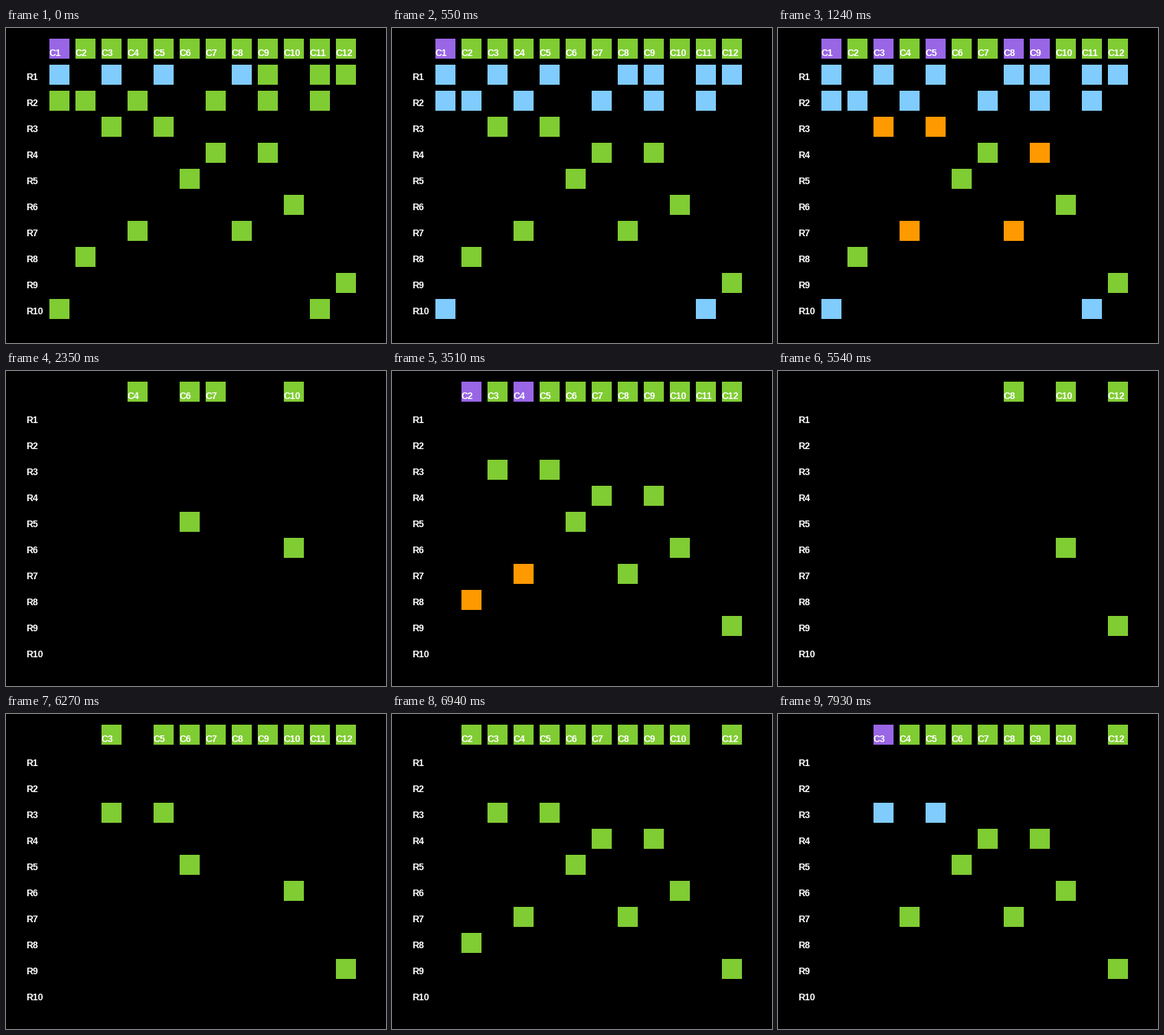
Write a matplotlib script that moves like this. It is 569 by 472 pixels and loops after 8000 ms.

```python
import numpy as np
import matplotlib.pyplot as plt
from matplotlib.animation import FuncAnimation
from matplotlib.collections import PolyCollection

W, H, DPI = 569, 472, 64
LOOP, TICK = 8000, 20
X0, Y0, PITCH, SIDE = 65, 16, 39, 30

BLACK, GREEN, PURPLE = "#000000", "#80cc33", "#9966e6"
BLUE, ORANGE = "#80ccff", "#ff9900"

# Columns covered by each row of the exact cover matrix
ROWS = {
    1: (1, 3, 5, 8, 9, 11, 12), 2: (1, 2, 4, 7, 9, 11), 3: (3, 5),
    4: (7, 9), 5: (6,), 6: (10,), 7: (4, 8), 8: (2,), 9: (12,), 10: (1, 11),
}

# start ms, end ms, action, evenly spaced steps ("|" separates, empty = wait)
SCRIPT = [
    (60, 550, "pick", "R1C9|R1C11|R1C12|R2C1 R2C2|R2C4|R2C7|R2C9|R2C11 R10C1|R10C11"),
    (800, 1420, "cover", "C3|R3C3|R3C5|C5|C8 R7C8|R7C4|C9|R4C9|R4C7 C11|C12|R9C12"),
    (1670, 1670, "drop", ""),
    (1850, 1910, "pick", "C2|R8C2"),
    (2350, 2350, "drop", ""),
    (2600, 3330, "show", "C2|R8C2||C12 R9C12|C11|C9|R4C9|R4C7 C8|R7C8|R7C4|C5|C3 R3C3|R3C5"),
    (3390, 3810, "cover", "C2|R8C2|C4 R7C4|R7C8|C7|R4C7|R4C9|C9 C11"),
    (4120, 4120, "drop", ""),
    (4240, 4360, "pick", "C3|R3C3|R3C5"),
    (4610, 4610, "cover", "C5"),
    (4920, 4920, "drop", ""),
    (5040, 5100, "pick", "C6|R5C6"),
    (5540, 5540, "drop", ""),
    (5790, 6630, "show", "C6|R5C6|C5|C3|R3C3|R3C5||C11 C9|C7|R4C7|R4C9|C4 R7C4|R7C8|C2|R8C2"),
    (6690, 6690, "cover", "C11"),
    (6940, 6940, "drop", ""),
    (7120, 7180, "pick", "C2|R8C2"),
    (7620, 7620, "drop", ""),
    (7810, 7930, "pick", "C3|R3C3|R3C5"),
]

cells = {f"C{c}": (c, 0) for c in range(1, 13)}
cells.update({f"R{r}C{c}": (c, r) for r, cols in ROWS.items() for c in cols})


def paint(action, name):
    if action == "show":
        return GREEN
    if name[0] == "C":
        return PURPLE
    return BLUE if action == "pick" else ORANGE


def build_states():
    state = dict.fromkeys(cells, GREEN)
    for name in ("C1", "R1C1", "R1C3", "R1C5", "R1C8"):
        state[name] = paint("pick", name)
    times, states = [0], [dict(state)]
    for start, end, action, text in SCRIPT:
        steps = text.split("|")
        for t, step in zip(np.linspace(start, end, len(steps)), steps):
            if action == "drop":
                for name, colour in state.items():
                    if colour != GREEN:
                        state[name] = BLACK
            for name in step.split():
                state[name] = paint(action, name)
            times.append(round(t, -1))
            states.append(dict(state))
    return times, states


def square(col, row):
    x, y = X0 + PITCH * (col - 1), Y0 + PITCH * row
    return [(x, y), (x + SIDE, y), (x + SIDE, y + SIDE), (x, y + SIDE)]


times, states = build_states()

fig = plt.figure(figsize=(W / DPI, H / DPI), dpi=DPI, facecolor=BLACK)
ax = fig.add_axes([0, 0, 1, 1])
ax.set_xlim(0, W)
ax.set_ylim(H, 0)
ax.axis("off")

squares = PolyCollection([square(*pos) for pos in cells.values()],
                         linewidths=0, antialiaseds=False)
ax.add_collection(squares)


def label(x, y, text):
    return ax.text(x, y, text, color="white", family="Liberation Sans",
                   weight="bold", size=14 * 72 / DPI, va="baseline")


for r in ROWS:
    label(30, 39 + PITCH * r, f"R{r}")
heads = {f"C{c}": label(X0 - 1 + PITCH * (c - 1), 42, f"C{c}")
         for c in range(1, 13)}


def update(i):
    now = i * TICK + TICK / 2
    state = states[np.searchsorted(times, now, side="right") - 1]
    squares.set_facecolor(list(state.values()))
    for name, text in heads.items():
        text.set_visible(state[name] != BLACK)
    return [squares, *heads.values()]


anim = FuncAnimation(fig, update, frames=LOOP // TICK, interval=TICK,
                     repeat=True, repeat_delay=0)
plt.show()
```
